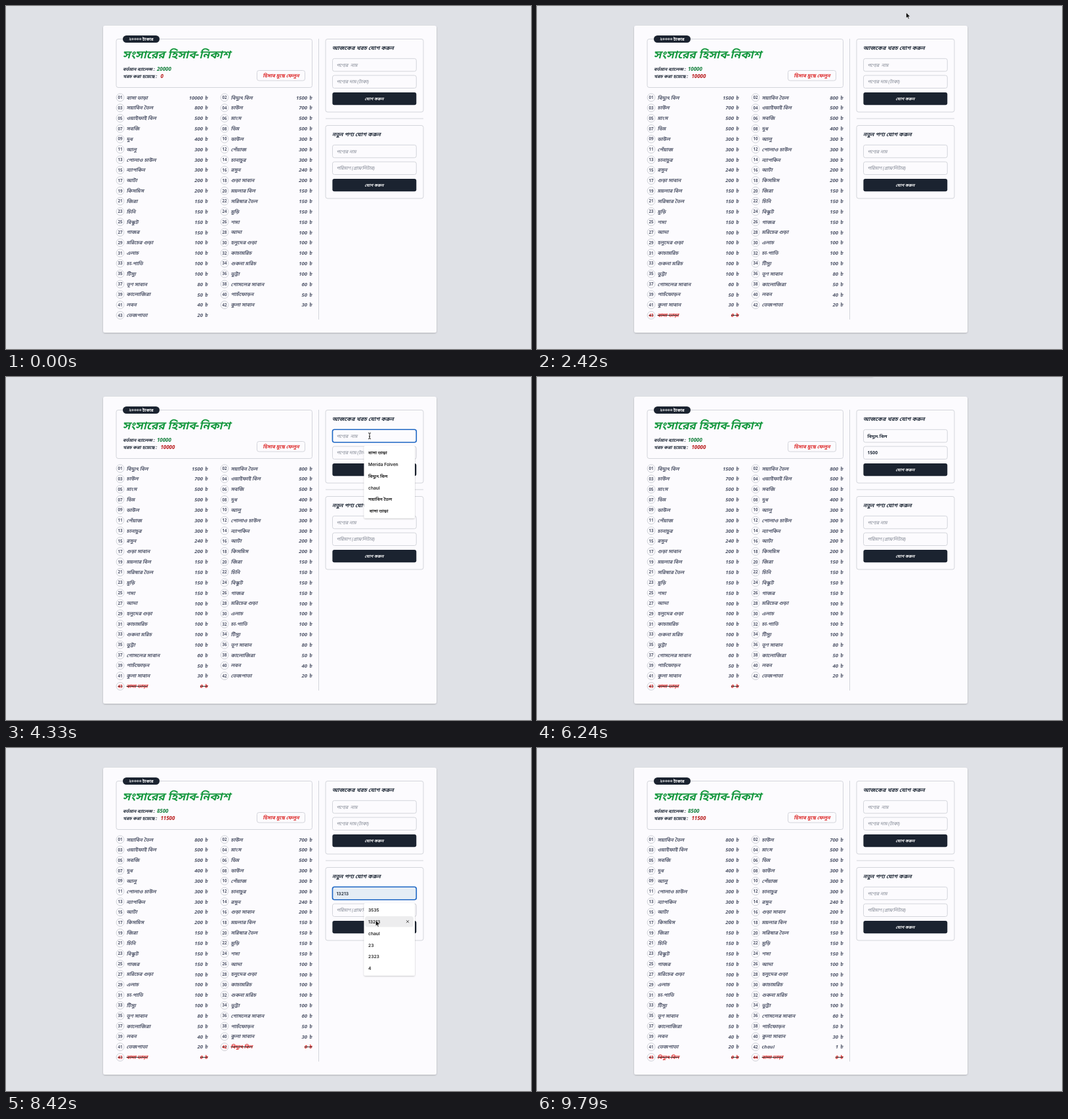
Recreate the animation shown at these times as an HTML page. Size 800x524 px, loop 9940 ms.

```html
<!DOCTYPE html>
<html lang="bn">
<head>
<meta charset="utf-8">
<title>সংসারের হিসাব-নিকাশ</title>
<style>
html, body { margin: 0; width: 100%; height: 100%; overflow: hidden; background: #dfe1e6; }
svg { display: block; width: 100vw; height: 100vh; font-family: "Noto Sans", "Noto Sans Bengali", sans-serif; }
text { white-space: pre; }
.ui { font-family: Inter, "Noto Sans Bengali", sans-serif; }
.slant { font-style: italic; }
.paid { text-decoration: line-through .6px; }
</style>
</head>
<body>
<svg id="stage" viewBox="0 0 800 524">
  <defs>
    <filter id="soft" x="-20%" y="-20%" width="140%" height="140%">
      <feDropShadow dx="0" dy="1" stdDeviation="1.2" flood-opacity=".22"/>
    </filter>
    <filter id="blur" x="-10%" y="-200%" width="120%" height="500%"><feGaussianBlur stdDeviation="1"/></filter>
  </defs>
</svg>
<script>
const LOOP = 9940, KEY_GAP = 60, BUDGET = 20000, MENU_ROW = 17.85, LIST_ROW = 15.84;
const INK = '#1f2937', GREY = '#d3d5db', DARK = '#1b2330', RED = '#dc2626', PAPER = '#fcfbfe';
const stage = document.getElementById('stage');

function add(tag, attrs, parent = stage, content) {
  const node = document.createElementNS('http://www.w3.org/2000/svg', tag);
  for (const key in attrs) node.setAttribute(key, attrs[key]);
  if (content !== undefined) node.textContent = content;
  parent.appendChild(node);
  return node;
}
const box = (x, y, width, height, attrs, parent) =>
  add('rect', { x, y, width, height, rx: 3, fill: 'none', stroke: GREY, ...attrs }, parent);
const solid = (x, y, width, height, fill, attrs, parent) =>
  box(x, y, width, height, { fill, stroke: 'none', ...attrs }, parent);
const label = (x, y, size, fill, content, attrs, parent) =>
  add('text', { x, y, 'font-size': size, fill, 'font-weight': 700, class: 'slant', ...attrs }, parent, content);
const show = (node, on) => node.setAttribute('display', on ? 'inline' : 'none');
const middle = { 'text-anchor': 'middle' };

// Household items, highest price first
const items = `10000:বাসা ভাড়া|1500:বিদ্যুৎ বিল|800:সয়াবিন তৈল|700:চাউল|500:ওয়াইফাই বিল,মাংস,সবজি,ডিম|400:দুধ
|300:ডাউল,আলু,পেঁয়াজ,পোলাও চাউল,চানাচুর,ন্যাপকিন|240:রসুন|200:আটা,গুড়া সাবান,কিসমিস
|150:ময়লার বিল,জিরা,সরিষার তৈল,চিনি,মুড়ি,বিস্কুট,শসা,গাজর
|100:আদা,মরিচের গুড়া,হলুদের গুড়া,এলাচ,কাচামরিচ,চা-পাতি,শুকনা মরিচ,টিস্যু,ভুট্টা|80:তূণ সাবান|60:গোসলের সাবান
|50:কালোজিরা,পাচঁফোড়ন|40:লবন|30:কুলা সাবান|20:তেজপাতা`.replace(/\n/g, '').split('|').flatMap(group => {
  const [price, names] = group.split(':');
  return names.split(',').map(name => ({ name, price: +price }));
});

// Each entry: focus the name, pick a suggestion, type the price, confirm. Times in ms.
const history = ['বাসা ভাড়া', 'Merida Folven', 'বিদ্যুৎ বিল', 'chaul', 'সয়াবিন তৈল'];
const entries = [
  { form: 0, rows: history, row: 0, price: '10000', x: 524,
    opens: 850, leaves: 1050, picks: 1300, types: 1550, presses: 1980, done: 2390, enter: [[120, 650, 430]] },
  { form: 0, rows: [...history, ' বাসা ভাড়া'], row: 2, price: '1500', x: 554,
    opens: 4270, leaves: 4380, picks: 4660, types: 5370, presses: 5940, done: 6700,
    enter: [[2420, 562.5, 10], [2980, 262, 104], [3600, 250, 466]] },
  { form: 1, rows: ['3535', '13213', 'chaul', '23', '2323', '4'], row: 2, price: '1', x: 562,
    opens: 8090, leaves: 8130, picks: 8700, types: 9100, done: 9400, enter: [[7820, 560, 2]] }
];

// Page and summary
solid(0, 0, 800, 524, '#dfe1e6', { rx: 0 });
solid(148, 30, 508, 469, PAPER, { filter: 'url(#soft)' });
box(168, 50.5, 298.5, 74);
solid(178, 45, 56, 11, DARK, { rx: 5.5 });
label(206, 52.7, 6.2, '#fff', '২০০০০ টাকার', { ...middle, class: '' });
label(177.5, 79.5, 16.9, '#16983f', 'সংসারের হিসাব-নিকাশ', { 'font-weight': 800 });
label(178, 98.5, 6.9, INK, 'বর্তমান ব্যালেন্স :');
label(178, 110.3, 6.9, INK, 'খরচ করা হয়েছে :');
const balance = label(230, 98.5, 7.9, '#15803d', '');
const spent = label(235.5, 110.3, 7.9, '#b91c1c', '');
box(382.5, 98.5, 73, 15.5);
label(419, 108.9, 7.4, RED, 'হিসাব মুছে ফেলুন', middle);
const list = add('g', {});
add('path', { d: 'M476.5 50V479M487 172H636', stroke: GREY });

// Forms
const formTop = form => 50 + form * 132;
function makeForm(form, title, hints) {
  const y = formTop(form);
  box(487, y + .5, 149, 111.5);
  label(497, y + 17.2, 8.3, INK, title);
  const fields = hints.map((hint, i) => {
    const top = y + 30.3 + i * 25.7;
    return {
      top,
      frame: box(497.5, top, 127.8, 19.5),
      hint: label(503.5, top + 12.3, 7, '#7d838f', hint, { 'font-weight': 500 }),
      value: label(503.5, top + 12.3, 6.8, INK, '', { 'font-weight': 600, class: '' }),
      caret: add('path', { d: `M504 ${top + 4.5}v11`, stroke: '#222', 'stroke-width': .7 })
    };
  });
  solid(497.4, y + 82, 127.9, 19.2, DARK);
  label(561, y + 94, 6.2, '#fff', 'যোগ করুন', middle);
  return fields;
}
const forms = [
  makeForm(0, 'আজকের খরচ যোগ করুন', ['পণ্যের  নাম', 'পণ্যের দাম (টাকা)']),
  makeForm(1, 'নতুন পণ্য যোগ করুন', ['পণ্যের নাম', 'পরিমাণ (গ্রাম/লিটার)'])
];

// Suggestion menus and pointer stops, both derived from the entries
for (const entry of entries) {
  const { form, rows, row, x, price, types, presses, picks } = entry;
  const [nameY, priceY] = forms[form].map(field => field.top + 9.7);
  entry.name = rows[row];
  entry.typed = types + price.length * KEY_GAP;
  entry.top = forms[form][0].top + 25.3;

  entry.menu = add('g', { class: 'ui' });
  solid(545.5, entry.top - .5, 77.5, rows.length * MENU_ROW + 3.5, '#fff', { rx: 2, filter: 'url(#soft)' }, entry.menu);
  entry.mark = add('g', {}, entry.menu);
  solid(547, 1.5, 74, 16.5, '#ededee', { rx: 4 }, entry.mark);
  add('path', { d: 'M610 7.7l4 4m0-4l-4 4', stroke: '#333', 'stroke-width': .8 }, entry.mark);
  rows.forEach((name, i) =>
    label(552, entry.top + 12.4 + i * MENU_ROW, 6.7, '#222', name, { 'font-weight': 600, class: '' }, entry.menu));

  const rowY = entry.top + 1 + (row + .5) * MENU_ROW, buttonY = formTop(form) + 89;
  entry.stops = [
    ...entry.enter, [entry.opens - 30, x, nameY], [entry.leaves, x, nameY],
    [picks - 100, 564, rowY], [picks, 564, rowY], [picks + 140, 545, priceY], [entry.typed, 545, priceY]
  ];
  if (presses) entry.stops.push([presses - 100, 560, buttonY], [presses, 560, buttonY], [presses + 170, 500, -12]);
}

function pointerAt(t) {
  const entry = entries.find(e => t >= e.stops[0][0] && t < e.stops.at(-1)[0]);
  if (!entry || (t >= entry.types && t < entry.typed)) return null;
  const next = entry.stops.findIndex(stop => stop[0] > t);
  const [t0, x0, y0] = entry.stops[next - 1], [t1, x1, y1] = entry.stops[next];
  const u = (t - t0) / (t1 - t0), ease = u * u * (3 - 2 * u);
  return { x: x0 + (x1 - x0) * ease, y: y0 + (y1 - y0) * ease };
}

// Lower shadow of the browser prompt, then the pointer shapes
const prompt = solid(293, -3, 220, 3.2, '#9a9ca3', { rx: 2, opacity: .65, filter: 'url(#blur)' });
const arrow = add('path', { d: 'M0 0V8.6L2 6.8L3.4 9.9L4.8 9.3L3.4 6.3H6.2Z', fill: '#000', stroke: '#fff', 'stroke-width': .6 });
const beam = add('path', { d: 'M-2-4.5Q0-4.5 0-3.5Q0-4.5 2-4.5M0-3.5V3.5M-2 4.5Q0 4.5 0 3.5Q0 4.5 2 4.5M-1 1H1', fill: 'none', stroke: '#111', 'stroke-width': .9 });

// Paid items drop to the end with a zero; new items join before them
function drawList(done) {
  const paid = items.filter(item => done.some(e => e.form === 0 && e.name === item.name));
  const added = done.filter(e => e.form === 1).map(e => ({ name: e.name, price: +e.price }));
  const rows = [
    ...items.filter(item => !paid.includes(item)), ...added,
    ...paid.map(({ name }) => ({ name, price: 0 })).reverse()
  ];
  list.textContent = '';
  rows.forEach(({ name, price }, i) => {
    const x = i % 2 * 159, y = 139.8 + (i >> 1) * LIST_ROW, color = price ? '#50566a' : RED;
    const row = add('g', { class: price ? '' : 'paid' }, list);
    add('circle', { cx: 174 + x, cy: y, r: 5.9, fill: PAPER, stroke: '#c9ccd3', 'stroke-width': .9 }, row);
    label(174 + x, y + 2.2, 6.1, color, String(i + 1).padStart(2, '0'), { ...middle, class: '' }, row);
    label(183.5 + x, y + 2.7, 7.5, color, name, { 'font-weight': 600 }, row);
    label(307.3 + x, y + 2.8, 7.8, color, price + ' ৳', { 'font-weight': 600, 'text-anchor': 'end' }, row);
  });
  const used = paid.reduce((sum, item) => sum + item.price, 0);
  balance.textContent = BUDGET - used;
  spent.textContent = used;
}

function drawField(field, value, active, guessed, t) {
  field.frame.setAttribute('stroke', active ? '#1d66c4' : GREY);
  field.frame.setAttribute('stroke-width', active ? 1.6 : 1);
  field.frame.setAttribute('fill', guessed ? '#e5edf5' : 'none');
  field.value.textContent = value;
  field.value.setAttribute('class', guessed ? 'ui' : '');
  show(field.hint, !value);
  show(field.caret, active && !value && t % 1000 < 300);
}

let drawnCount = -1;
function render(t) {
  const pointer = pointerAt(t), done = entries.filter(e => t >= e.done);
  if (done.length !== drawnCount) {
    drawnCount = done.length;
    drawList(done);
  }

  let guess = '';
  for (const entry of entries) {
    const open = t >= entry.opens + 20 && t < entry.picks;
    const inside = open && pointer && pointer.x > 545 && pointer.x < 623;
    const row = inside ? Math.floor((pointer.y - entry.top - 1) / MENU_ROW) : -1;
    const hovered = entry.rows[row] || '';
    guess = guess || hovered;
    show(entry.menu, open);
    show(entry.mark, hovered);
    if (hovered) entry.mark.setAttribute('transform', `translate(0 ${entry.top + row * MENU_ROW})`);
  }

  const current = entries.find(e => t >= e.opens && t < e.done);
  forms.forEach(([nameField, priceField], form) => {
    const entry = current && current.form === form ? current : null;
    const onPrice = entry && t >= entry.picks + 140;
    const name = !entry ? '' : t >= entry.picks ? entry.name : guess;
    const keys = entry ? Math.max(0, Math.floor((t - entry.types) / KEY_GAP) + 1) : 0;
    drawField(nameField, name, entry && !onPrice, entry && guess, t);
    drawField(priceField, entry ? entry.price.slice(0, keys) : '', onPrice && !(t >= entry.presses), false, t);
  });
  show(prompt, current && t >= current.presses + 20);

  const overField = pointer && !guess && pointer.x > 497 && pointer.x < 626 &&
    forms.flat().some(field => pointer.y > field.top && pointer.y < field.top + 20);
  show(arrow, pointer && !overField);
  show(beam, overField);
  if (pointer) (overField ? beam : arrow).setAttribute('transform', `translate(${pointer.x} ${pointer.y})`);
}

const start = performance.now();
function tick() {
  render((performance.now() - start) % LOOP);
  requestAnimationFrame(tick);
}
tick();
</script>
</body>
</html>
```
